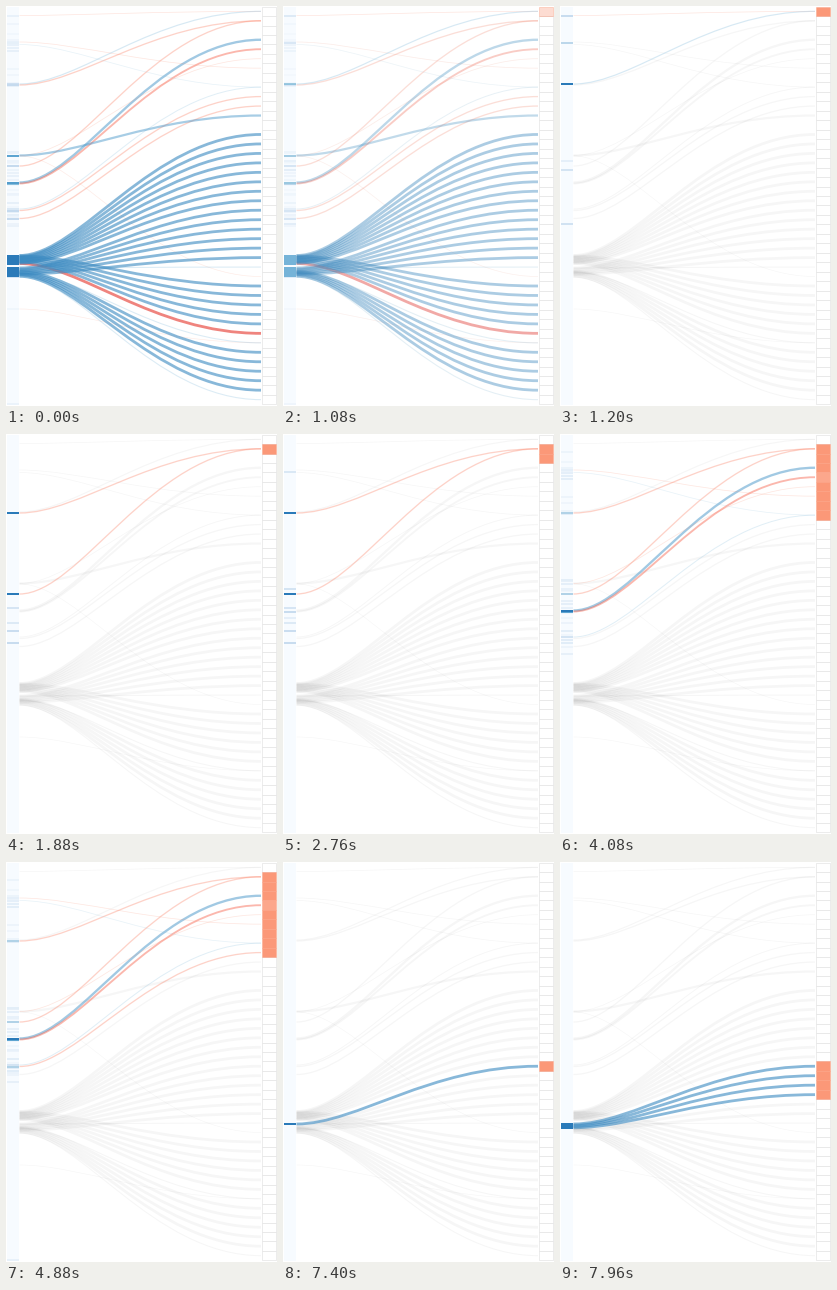
Animation, 271 px wide and 400 px high, one loop 8000 ms. Source, as a matplotlib script:

```python
import numpy as np
import matplotlib.pyplot as plt
from matplotlib.animation import FuncAnimation
from matplotlib.patches import PathPatch, Rectangle
from matplotlib.path import Path

W, H, DPI = 271, 400, 100
STEP, LOOP = 40, 8000
TOP, BOTTOM, CELLS = 0.6, 398.4, 42
LEFT, RIGHT, END = 13.5, 255.0, 269.5
CELL_H = (BOTTOM - TOP) / CELLS
GREY = 0.035
GRID, PICKED, LATEST = "#e4e4e4", "#fb9878", "#fca78c"

# left height, right cell, value: positive is blue, negative is red
links = [
    (9.5, 0, -0.1), (78, 0, 0.3), (79, 1, -0.35), (160, 1, -0.35),
    (176.5, 3, 0.8), (177.5, 4, -0.6), (149.5, 5, -0.1), (36, 6, -0.1),
    (38.5, 8, 0.1), (203, 8, 0.2), (204.5, 9, -0.35), (212.5, 10, -0.35),
    (149.5, 11, 0.75), (150, 28, -0.05), (257.5, 34, -1), (303, 35, -0.05),
]
hubs = [y for y, cell, _ in links if cell < 11]

# fans of strong links: first cell, last cell, left height, left spacing
for first, last, y, gap in [(13, 20, 249.5, 1.1), (21, 26, 262, 1.25),
                            (29, 33, 250, 1.5), (36, 40, 265.5, 1.2)]:
    links += [(y + gap * i, first + i, 1) for i in range(last - first + 1)]
links += [(y, cell, 0.25) for y, cell in zip((262, 266, 271), (27, 35, 41))]

# weak entries scattered around the hubs, too faint for a link
rng = np.random.default_rng(4)
marks = [(rng.choice(hubs) + rng.normal(0, 8), cell, rng.uniform(0.02, 0.12))
         for cell in range(10) for _ in range(4)]

# first cell of each brush stroke, and when it grows by one cell
STROKES = [
    (0, [1040]),
    (1, [1880, 2760, 3280, *range(3680, 4081, 100), 4320]),
    (21, [7400, 7600, 7760, 7960]),
]


def center(cell):
    return TOP + (cell + 0.5) * CELL_H


def curve(y0, y1):
    x0, x1 = LEFT + np.array([0.25, 0.55]) * (RIGHT - LEFT)
    return Path([(LEFT, y0), (x0, y0), (x1, y1), (RIGHT, y1)],
                [Path.MOVETO] + [Path.CURVE4] * 3)


def tint(value):
    cmap = plt.cm.Blues if value > 0 else plt.cm.Reds
    size = abs(value)
    return np.array([*cmap(0.4 + 0.26 * size)[:3], 0.15 + 0.45 * size])


def to_grey(rgba, amount):
    """Fade a translucent colour into faint black."""
    alpha = (1 - amount) * rgba[3] + amount * GREY
    return np.array([*((1 - amount) * rgba[3] / alpha * rgba[:3]), alpha])


def heat(first, last):
    """Relative weight of each pixel row for a range of cells."""
    rows = np.zeros(H)
    for y, cell, value in links + marks:
        if first <= cell <= last:
            a = int(round(y - 0.9))
            rows[a:a + 2] = np.maximum(rows[a:a + 2], abs(value))
    return rows[1:399] / rows.max()


def brushed(t):
    span = None
    for first, times in STROKES:
        count = sum(t >= start for start in times)
        if count:
            span = first, first + count - 1
    return span


fig = plt.figure(figsize=(W / DPI, H / DPI), dpi=DPI, facecolor="white")
ax = fig.add_axes([0, 0, 1, 1])
ax.axis("off")

column = ax.imshow(np.zeros((398, 1)), cmap="Blues", vmin=0, vmax=1.4,
                   extent=(1, LEFT - 0.5, 399, 1), aspect="auto",
                   interpolation="nearest")
ribbons = [
    ax.add_patch(PathPatch(curve(y, center(cell)), fill=False, capstyle="butt",
                           lw=(0.5 + 2.3 * abs(value)) * 72 / DPI))
    for y, cell, value in links
]
boxes = [
    ax.add_patch(Rectangle((RIGHT + 0.5, TOP + i * CELL_H), END - RIGHT,
                           CELL_H, lw=0.5))
    for i in range(CELLS)
]
ax.set_xlim(0, W)
ax.set_ylim(H, 0)
overview = heat(0, CELLS)


def draw(frame):
    t = frame * STEP
    span = brushed(t)
    first, last = span or (0, CELLS)
    fade = np.clip((t - 1040) // 80 + 1, 0, 3) / 3

    column.set_data(((1 - fade) * overview + fade * heat(first, last))[:, None])

    for ribbon, (_, cell, value) in zip(ribbons, links):
        active = first <= cell <= last
        rgba = tint(value) if active else to_grey(tint(value), fade)
        ribbon.set_edgecolor(tuple(rgba))
        ribbon.set_zorder(3 if active else 2)

    for i, box in enumerate(boxes):
        on = span is not None and first <= i <= last
        box.set_facecolor((LATEST if i == 4 else PICKED, fade) if on else "white")
        box.set_edgecolor((PICKED, 0.5) if on else GRID)
        box.set_zorder(6 if on else 5)
    return [column, *ribbons, *boxes]


anim = FuncAnimation(fig, draw, frames=LOOP // STEP, interval=STEP,
                     repeat=True, repeat_delay=0, blit=False)
plt.show()
```
